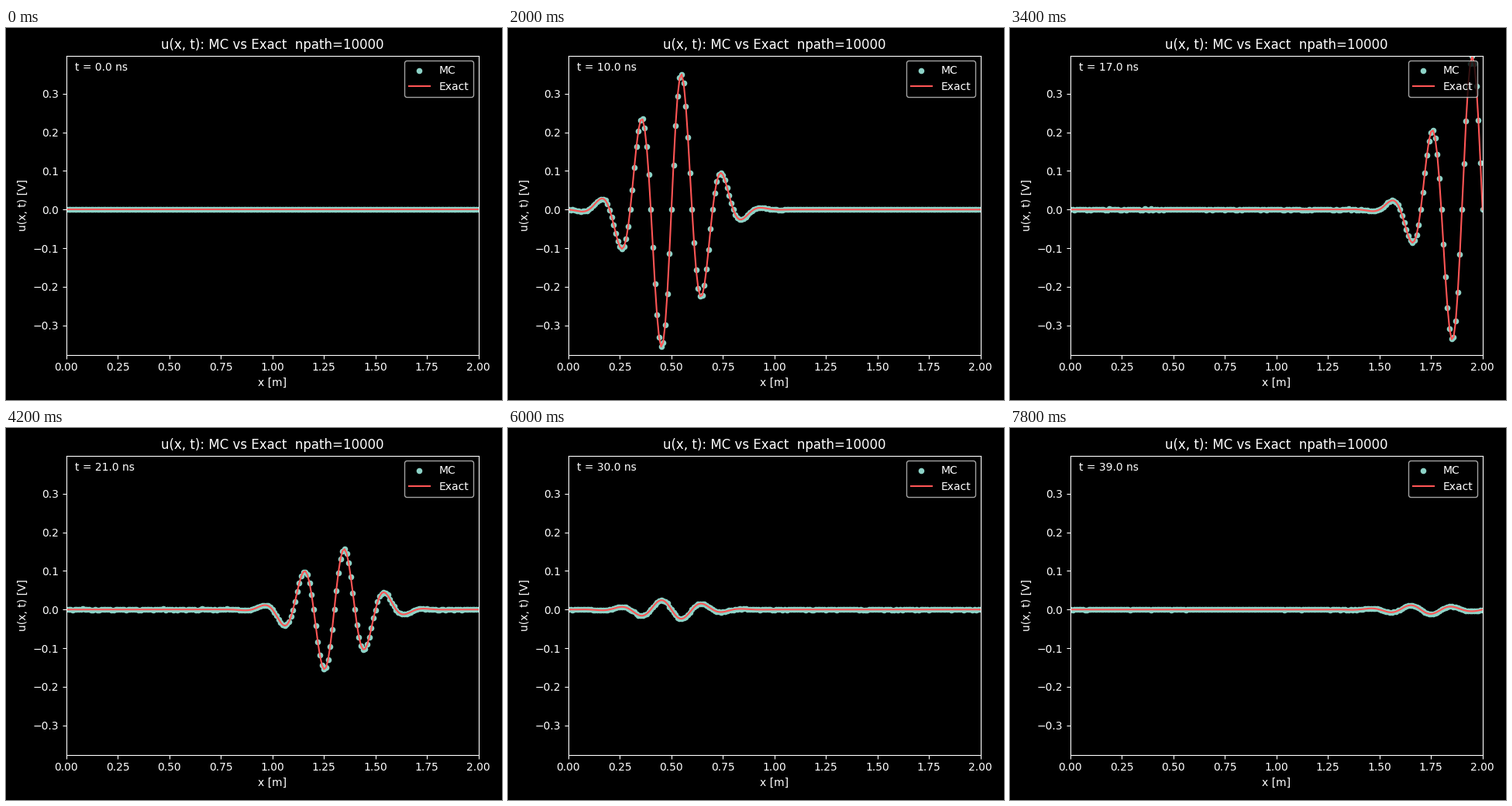
A matplotlib script that plays this animation: 640x480 px, repeating every 8000 ms.

```python
import numpy as np
import matplotlib.pyplot as plt
from matplotlib.animation import FuncAnimation

STEPS = 40           # one step per nanosecond
SPEED = 0.2          # m/ns
LENGTH = 2.0         # m
DELAY, SIGMA = 7.5, 0.75
AMP = 0.4
LOSS = 0.14          # attenuation per metre travelled
LOAD, SOURCE = -0.6, 0.2     # reflection factors at the two ends

x = np.linspace(0, LENGTH, 201)


def wave(t, path):
    """Damped pulse after it has travelled the given path."""
    s = t - path / SPEED
    envelope = np.exp(-0.5 * ((s - DELAY) / SIGMA) ** 2 - LOSS * path)
    return AMP * envelope * np.sin(2 * np.pi * s)


def exact(t):
    """Sum of the forward and backward waves over the first round trips."""
    total, gain = np.zeros_like(x), 1.0
    for trip in range(3):
        start = 2 * LENGTH * trip
        total += gain * wave(t, start + x)
        gain *= LOAD
        total += gain * wave(t, start + 2 * LENGTH - x)
        gain *= SOURCE
    return total


def monte_carlo(t):
    """Exact wave plus sampling noise behind the wave front."""
    rng = np.random.default_rng(100 + t)
    spread = 0.0008 * np.exp(-max(t - 20, 0) / 30)
    passed = t - x / SPEED > 7
    return exact(t) + spread * passed * rng.standard_normal(x.size)


plt.style.use("dark_background")
plt.rcParams["font.family"] = "DejaVu Sans"
fig, ax = plt.subplots(figsize=(6.4, 4.8), dpi=100)
dots = ax.scatter(x, exact(0), s=20, color="#8dd3c7", label="MC")
line, = ax.plot(x, exact(0), color="#ff5555", lw=1.5, label="Exact")
clock = ax.text(0.02, 0.95, "t = 0.0 ns", transform=ax.transAxes)
ax.set_xlim(0, LENGTH)
ax.set_ylim(-0.3765, 0.3992)
ax.set_xlabel("x [m]")
ax.set_ylabel("u(x, t) [V]")
ax.set_title("u(x, t): MC vs Exact  npath=10000")
ax.legend(loc="upper right")
fig.tight_layout()
fig.subplots_adjust(top=1 - 35.5 / 480)


def update(t):
    dots.set_offsets(np.column_stack([x, monte_carlo(t)]))
    line.set_ydata(exact(t))
    clock.set_text(f"t = {t:.1f} ns")
    return dots, line, clock


anim = FuncAnimation(fig, update, frames=STEPS, interval=200,
                     repeat=True, repeat_delay=0, blit=False)
plt.show()
```
